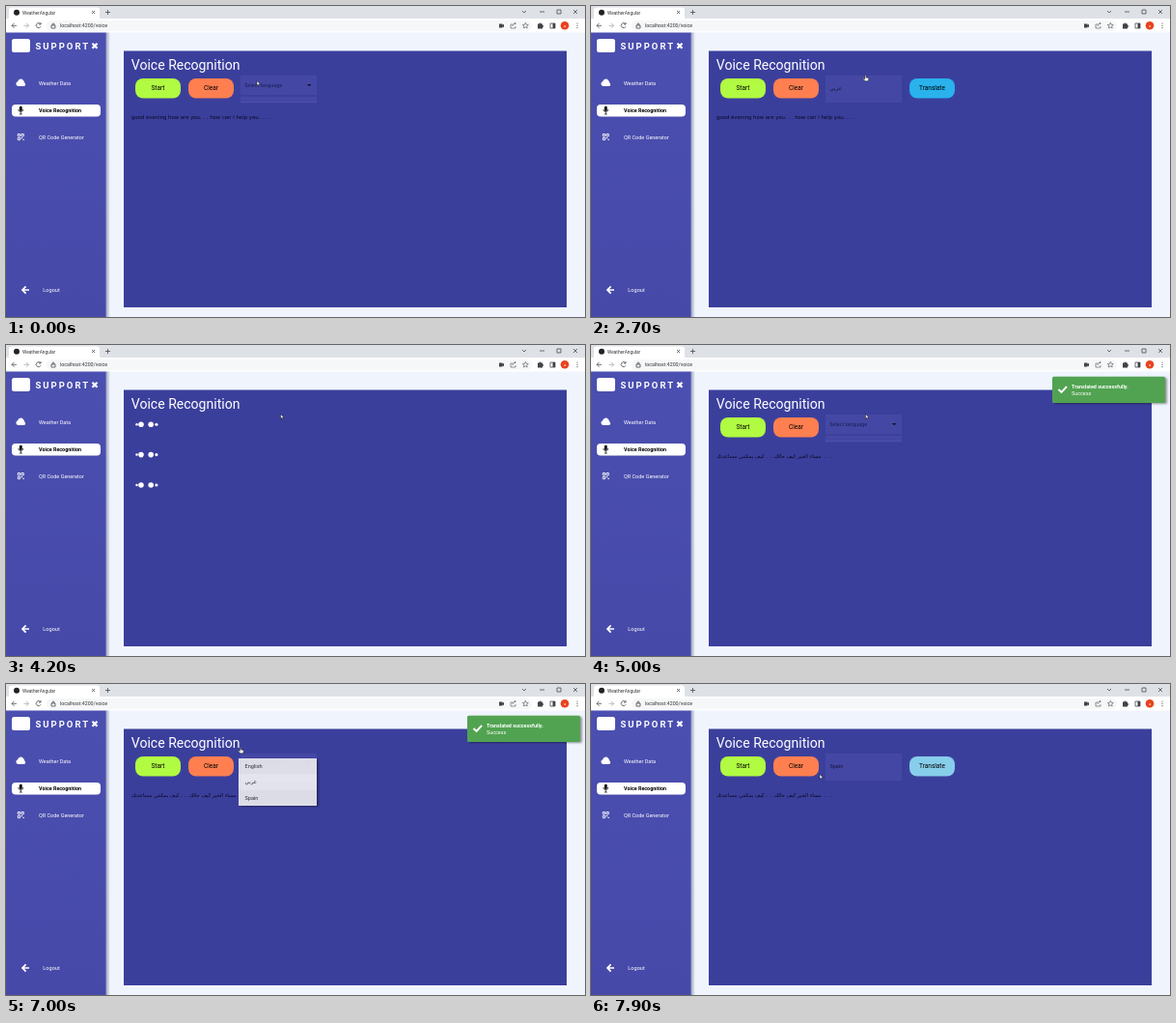
Write an HTML page that moves like this. It is 600 px wide and 322 px high and loops after 8000 ms.

```html
<!DOCTYPE html>
<html lang="en">
<head>
<meta charset="utf-8">
<title>Voice Recognition</title>
<style>
html, body { margin: 0; width: 100%; height: 100%; overflow: hidden; }
svg { display: block; width: 100vw; height: 100vh; }
text { font: 5.5px Roboto, Arial, sans-serif; }
.bold { font-weight: 700; }
.white { fill: #fff; }
#message { font: 5.35px "DejaVu Sans", sans-serif; fill: #080a20; }
.line { fill: none; stroke: #4a4d52; stroke-width: .8; }
</style>
</head>
<body>
<svg viewBox="0 0 600 322">
  <defs>
    <linearGradient id="side" x2="0" y2="1">
      <stop stop-color="#4b4fb0"/><stop offset="1" stop-color="#4649a8"/>
    </linearGradient>
    <linearGradient id="shade">
      <stop stop-color="#8f96b8"/><stop offset="1" stop-color="#f0f5fd"/>
    </linearGradient>
    <filter id="drop" x="-10%" y="-20%" width="120%" height="150%">
      <feDropShadow dy="1" stdDeviation="1.2" flood-opacity=".4"/>
    </filter>
  </defs>

  <!-- browser -->
  <rect width="600" height="322" fill="#f0f5fd"/>
  <rect width="600" height="14" fill="#dee1e6"/>
  <path d="M1 14Q3 14 3 11V4Q3 1.500 6 1.500H94Q97 1.500 97 4V11Q97 14 99 14Z" fill="#fff"/>
  <rect y="13" width="600" height="14.500" fill="#fff"/>
  <rect x="42" y="15" width="503" height="11" rx="5.500" fill="#f6f7f8"/>
  <circle cx="11" cy="6.700" r="3" fill="#222"/>
  <text x="17" y="8.700" style="font-size:4.800px" fill="#333">WeatherAngular</text>
  <text x="56" y="22.200" style="font-size:5.250px" fill="#333">localhost:4200/voice</text>
  <g class="line">
    <path d="M89 5l3 3m0-3l-3 3M103 6.500h5m-2.500-2.500v5M535 5l2 2 2-2M553 6h5M571 4h4v4h-4zM588 4l4 4m0-4l-4 4"/>
    <path d="M11 20.300H6m2.500-2.500L6 20.300l2.500 2.500"/>
    <path d="M18.500 20.300h5m-2.500-2.500l2.500 2.500-2.500 2.500" stroke="#aaa"/>
    <path d="M35.800 18.700a2.500 2.500 0 1 0 .2 2.500M36 17v2h-2"/>
    <path d="M47 20h4v3h-4zM48 20v-1a1 1 0 0 1 2 0v1"/>
    <path d="M525 19h-2v4h5v-2M525 21q0-3 3-3m-1-1l1.300 1-1.300 1" stroke-width=".6"/>
    <path d="M538.300 17.300l.9 2 2.100.2-1.600 1.400.5 2.100-1.900-1.100-1.900 1.100.5-2.100-1.600-1.400 2.100-.2z" stroke-width=".6"/>
    <path d="M564 18h5v5h-5z"/>
  </g>
  <g fill="#404348">
    <path d="M511 18.500h3.500v1.200l1.500-1v3.600l-1.500-1v1.200H511zM551 18.500h1.500a1 1 0 0 1 2 0h1.500v1.500a1 1 0 0 1 0 2v1.500h-5zM566.500 18h2.500v5h-2.500z"/>
    <circle cx="592" cy="18" r=".6"/><circle cx="592" cy="20.300" r=".6"/><circle cx="592" cy="22.600" r=".6"/>
  </g>
  <circle cx="579" cy="20.300" r="4.300" fill="#e8431f"/>
  <text x="579" y="21.700" text-anchor="middle" class="white" style="font-size:4px">a</text>

  <!-- sidebar -->
  <rect x="103" y="27.500" width="5" height="295" fill="url(#shade)"/>
  <rect y="27.500" width="103.500" height="295" fill="url(#side)"/>
  <rect x="6" y="34" width="19" height="14" rx="2.500" class="white"/>
  <text x="30.500" y="44.600" class="bold white" style="font-size:9.500px;letter-spacing:2px">SUPPORT</text>
  <path d="M89.500 38.800l5 5m0-5l-5 5" stroke="#fff" stroke-width="2.200"/>
  <path class="white" d="M12.500 83a2.400 2.400 0 0 1-.3-4.700 3.100 3.100 0 0 1 5.700-1.200 2 2 0 0 1 1 2.200 1.900 1.900 0 0 1-.6 3.700z"/>
  <text x="34" y="81.800" class="white">Weather Data</text>
  <rect x="6" y="102" width="92" height="12.500" rx="4" class="white"/>
  <rect x="13.900" y="103.700" width="2.800" height="5.300" rx="1.400"/>
  <path d="M12.800 107a2.500 2.500 0 0 0 5 0M15.300 109.500v2.500m-1.500 0h3" fill="none" stroke="#000" stroke-width=".7"/>
  <text x="34" y="110" class="bold" style="font-size:5.400px">Voice Recognition</text>
  <path d="M12.300 132.500h2.300v2.300h-2.300zM16 132.500h2.300v2.300H16zM12.300 136.400h2.300v2.300h-2.300z" fill="none" stroke="#fff" stroke-width=".9"/>
  <path d="M15.700 136h1.300v1.300h-1.300zM17.500 137.700h1.300v1.300h-1.300z" class="white"/>
  <text x="34" y="138" class="white">QR Code Generator</text>
  <path d="M24 294h-7m3.600-3.600L17 294l3.600 3.600" fill="none" stroke="#fff" stroke-width="1.700"/>
  <text x="38.300" y="296" class="white" style="font-size:5.600px">Logout</text>

  <!-- page -->
  <rect x="122" y="46.500" width="459" height="265.500" fill="#3b3f9c"/>
  <text x="129.800" y="66" class="white" style="font-size:14.050px">Voice Recognition</text>
  <g id="form">
    <g id="buttons" class="bold" text-anchor="middle"></g>
    <rect x="243" y="72" width="79" height="28" fill="#4547a4"/>
    <g id="empty">
      <path d="M243 93h79" stroke="#35398f" stroke-width=".9"/>
      <path d="M243 99.700h79" stroke="#565ab0" stroke-width=".6"/>
      <path d="M312 81h4.400l-2.200 2.300z" fill="#10122c"/>
      <text x="247.300" y="84.300" fill="#1d2058">Select language</text>
    </g>
    <text id="chosen" x="247.500" y="87.300" fill="#15173f"></text>
    <text id="message" x="130" y="117"></text>
  </g>
  <g id="loader" class="white"></g>

  <g id="list">
    <rect id="sheet" x="241" y="77" height="49" rx="1.500" fill="#fff" filter="url(#drop)"/>
    <g id="rows"></g>
  </g>

  <g id="toast">
    <rect x="478" y="32.800" width="117" height="27.200" rx="1.500" fill="#51a351" filter="url(#drop)"/>
    <path d="M484.500 46l3 3 5.500-6" fill="none" stroke="#fff" stroke-width="1.900"/>
    <text x="498" y="44.700" class="bold white" style="font-size:5.400px">Translated successfully.</text>
    <text x="498" y="52.300" class="white" style="font-size:5.400px">Success</text>
  </g>

  <g id="cursor" stroke-width=".5" stroke-linejoin="round">
    <path id="arrow" d="M0 0v4.800l1.100-1 .8 1.800.8-.4-.8-1.700h1.500z" fill="#fff" stroke="#111"/>
    <path id="hand" d="M-.6.400q.6-.8 1.200 0V2.500l2 .4q.8.200.7 1L2.900 6.300H-.4L-2.400 3.900q.2-.9 1.100-.3l.7.600z" fill="#fff" stroke="#111"/>
  </g>
</svg>
<script>
const $ = id => document.getElementById(id);
const show = (id, on) => $(id).style.display = on ? '' : 'none';
const ramp = (t, from, to) => Math.min(1, Math.max(0, (t - from) / (to - from)));
const within = (t, from, to) => t >= from && t < to;

const LOOP = 8000, OPEN = [1250, 6890], CLOSE = [2100, 7650];
const LOADING = 3300, LOADED = 4450;
const ENGLISH = 'good evening how are you. . . how can I help you. . . .';
const ARABIC = 'مساء الخير كيف حالك. . . كيف يمكنني مساعدتك. . . .';
const languages = ['English', 'عربي', 'Spain'];

// time, x, y of the pointer tip
const path = [
  [0, 260, 77.5], [800, 260, 77.5], [1250, 245, 79.5], [1650, 245, 79.5],
  [1950, 250, 101], [2150, 250, 101], [2600, 284.5, 71.5], [5500, 284.5, 71.5],
  [6500, 243, 65.5], [7050, 243, 65.5], [7400, 247, 115], [7650, 247, 115],
  [7880, 237, 93.5], [LOOP, 237, 93.5]
];

$('buttons').innerHTML = [['Start', 134, '#b1fb42'], ['Clear', 189, '#ff7f50'], ['Translate', 330, '#87ceeb']]
  .map(([name, x, fill]) => `<g id="${name}"><rect x="${x}" y="75" width="47" height="20.500" rx="8" fill="${fill}"/>
    <text x="${x + 23.5}" y="87" style="font-size:6.500px">${name}</text></g>`).join('');

$('rows').innerHTML = languages.map((name, i) =>
  `<rect x="241" y="${77 + i * 16.3}" height="16.300"/>
   <text x="247.500" y="${87 + i * 16.3}" style="font-size:5.600px" fill="#2b2b2b">${name}</text>`).join('');

$('loader').innerHTML = [82.3, 113.6, 145]
  .map(y => `<circle cy="${y}"/>`.repeat(4)).join('');

const rows = [...$('rows').querySelectorAll('rect')];
const dots = [...$('loader').children];

function pointer(t) {
  const i = path.findIndex(p => p[0] > t);
  const [a, b] = [path[i - 1], path[i]];
  const k = ramp(t, a[0], b[0]), e = k * k * (3 - 2 * k);
  return [1, 2].map(n => a[n] + (b[n] - a[n]) * e);
}

function drawLoader(t) {
  const k = ((t + 94) % 600) / 600;
  // closed form of cubic-bezier(0, 1, 1, 0)
  const e = .5 + 4 * Math.sin(Math.asin(2 * k - 1) / 3) ** 3;
  const x = [135.5, 135.5 + 10.2 * e, 145.7 + 10.2 * e, 155.9];
  const r = [e, 1, 1, 1 - e];
  dots.forEach((dot, i) => {
    dot.setAttribute('cx', x[i % 4]);
    dot.setAttribute('r', 2.8 * r[i % 4]);
  });
}

function drawList(t) {
  const n = t < 4000 ? 0 : 1;
  const opening = ramp(t, OPEN[n], OPEN[n] + 125);
  show('list', within(t, OPEN[n], CLOSE[n] + 100));
  $('list').style.opacity = opening * (1 - ramp(t, CLOSE[n], CLOSE[n] + 100));
  const width = opening < 1 ? 81 : 83;
  $('sheet').setAttribute('width', width);
  const colors = n === 0 ? ['#f1f2f2', '#f1f2f2', '#fff']
    : t < 7250 ? ['#f1f1f1', '#f9f9f9', '#f1f1f1'] : ['#fff', '#fff', '#f1f1f1'];
  rows.forEach((row, i) => {
    row.setAttribute('width', width);
    row.setAttribute('fill', colors[i]);
  });
}

function draw(now) {
  const t = now % LOOP;
  const loading = within(t, LOADING, LOADED);
  const choice = within(t, CLOSE[0], LOADING) ? languages[1] : t >= CLOSE[1] ? languages[2] : '';

  show('form', !loading);
  show('loader', loading);
  show('empty', !choice);
  show('Translate', choice);
  $('Translate').firstChild.setAttribute('fill', within(t, 2500, LOADING) ? '#29b2ec' : '#87ceeb');
  $('chosen').textContent = choice;
  $('message').textContent = t < LOADED ? ENGLISH : ARABIC;

  drawLoader(t);
  drawList(t);
  $('toast').style.opacity = ramp(t, 4400, 4700) * (1 - ramp(t, 7450, 7750));

  const hand = within(t, 1000, LOADING) || within(t, 6300, 7750);
  show('hand', hand);
  show('arrow', !hand);
  $('cursor').setAttribute('transform', `translate(${pointer(t)})`);
  requestAnimationFrame(() => draw(performance.now()));
}
draw(0);
</script>
</body>
</html>
```
